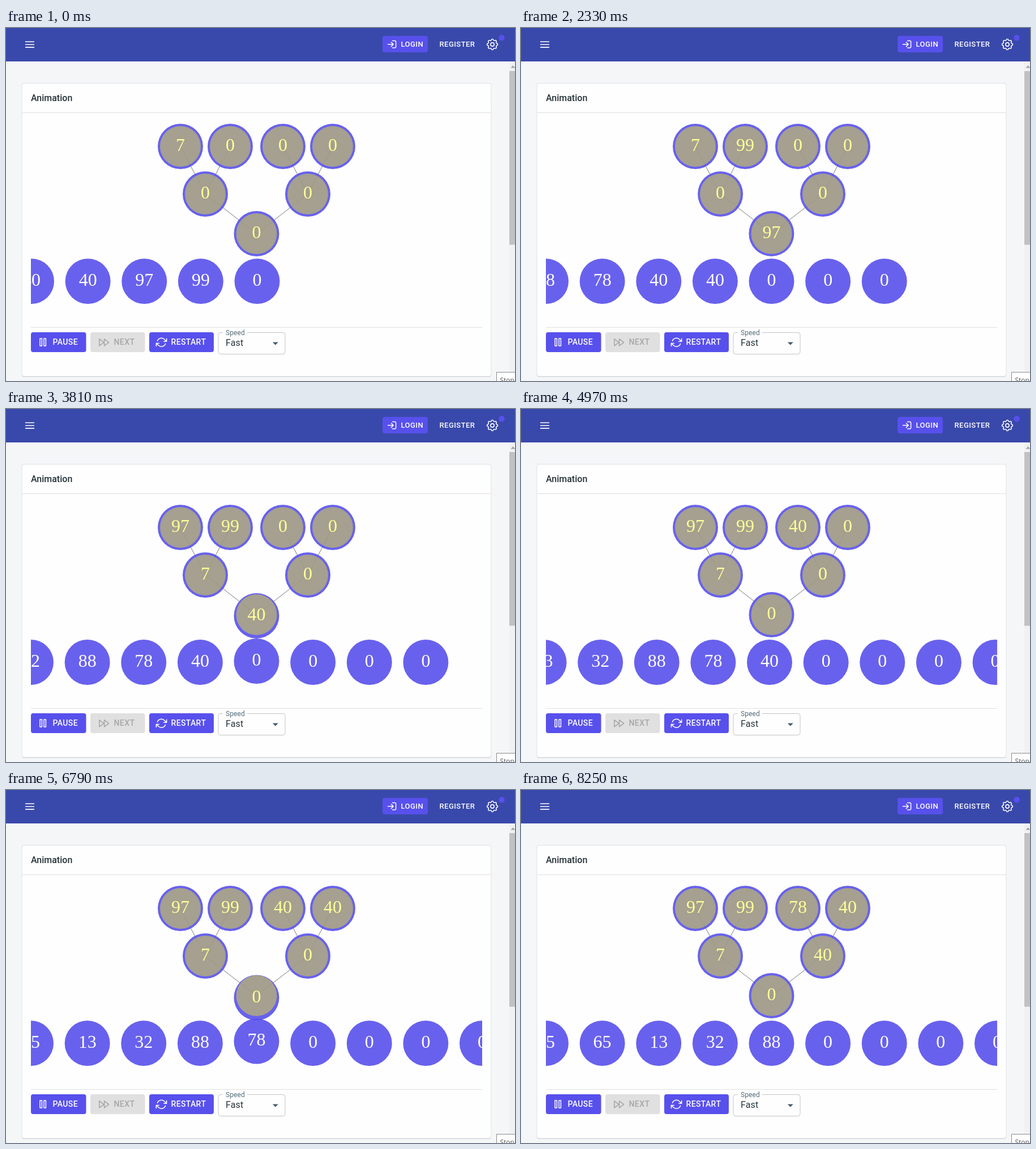
Write an HTML page with a canvas that moves like this. It is 899 px wide and 623 px high and loops after 8330 ms.

```html
<!DOCTYPE html>
<html lang="en">
<head>
<meta charset="utf-8">
<title>Heap animation</title>
<style>
  html, body { margin: 0; width: 100%; height: 100%; overflow: hidden; background: #f4f6f8; }
  #stage { position: absolute; left: 0; top: 0; width: 899px; height: 623px; overflow: hidden; }
  svg, canvas { position: absolute; display: block; }
  svg { left: 0; top: 0; }
  canvas { left: 44px; top: 151px; }
  text { font-family: Roboto, sans-serif; }
  .btn { font-size: 14px; font-weight: 500; letter-spacing: .4px; }
  .nav { font-size: 13px; font-weight: 500; letter-spacing: .46px; fill: #fff; }
  .icon { fill: none; stroke: #fff; stroke-width: 1.5; stroke-linecap: round; stroke-linejoin: round; }
</style>
</head>
<body>
<div id="stage">
<svg width="899" height="623" viewBox="0 0 899 623">
  <rect width="899" height="623" fill="#f4f6f8"/>

  <!-- card -->
  <rect x="28" y="98" width="829" height="518" rx="4" fill="#d3d6d9"/>
  <rect x="27.5" y="97" width="830" height="518" rx="4.5" fill="#dfe2e5"/>
  <rect x="28.5" y="98" width="828" height="516.3" rx="4" fill="#fefefe"/>
  <text x="44" y="129" font-size="16" font-weight="500" fill="#263238">Animation</text>
  <path d="M28 149.5H857M44 528.5H841" stroke="#e0e0e0"/>

  <!-- controls -->
  <rect x="44" y="537" width="97.5" height="35" rx="4" fill="#5850ec"/>
  <path class="icon" d="M60 548h3.4v13H60zM67 548h3.4v13H67z"/>
  <text class="btn" x="82.5" y="559" fill="#fff">PAUSE</text>

  <rect x="149" y="537" width="96.5" height="35" rx="4" fill="#e0e0e0"/>
  <path class="icon" style="stroke:#a6a6a6" d="M164.8 548.8l8 6-8 6zM173.6 548.8l8 6-8 6z"/>
  <text class="btn" x="190.5" y="559" fill="#a6a6a6">NEXT</text>

  <rect x="253" y="537" width="114" height="35" rx="4" fill="#5850ec"/>
  <g class="icon" style="stroke-width:1.8" transform="translate(264.5 544.8) scale(.833)">
    <path d="M23 4v6h-6M1 20v-6h6M3.51 9a9 9 0 0 1 14.85-3.36L23 10M1 14l4.64 4.36A9 9 0 0 0 20.49 15"/>
  </g>
  <text class="btn" x="291.5" y="559" fill="#fff">RESTART</text>

  <rect x="375" y="537.5" width="118" height="38" rx="4" fill="none" stroke="#c4c4c4"/>
  <rect x="383" y="535" width="43" height="5" fill="#fefefe"/>
  <text x="388" y="542" font-size="12" letter-spacing=".1" fill="#546e7a">Speed</text>
  <text x="388" y="561" font-size="16" letter-spacing=".15" fill="#263238">Fast</text>
  <path d="M470.8 554.5h10l-5 5z" fill="#455a6b"/>

  <!-- top bar -->
  <rect width="899" height="59" fill="#3949ab"/>
  <path d="M34 24.3h16M34 29.2h16M34 34.1h16" stroke="#fff" stroke-width="1.6"/>
  <rect x="665" y="14" width="80" height="29" rx="4" fill="#5850ec"/>
  <path class="icon" d="M674.5 28.8h9.6M680.4 25l3.8 3.8-3.8 3.8M682.6 22.5h4.2a1.8 1.8 0 0 1 1.8 1.8v9a1.8 1.8 0 0 1-1.8 1.8h-4.2"/>
  <text class="nav" x="697.5" y="32.5">LOGIN</text>
  <text class="nav" x="765.5" y="32.5">REGISTER</text>
  <g class="icon" transform="translate(846.4 16.4) scale(1.05)">
    <path d="M10.325 4.317c.426-1.756 2.924-1.756 3.35 0a1.724 1.724 0 0 0 2.573 1.066c1.543-.94 3.31.826 2.37 2.37a1.724 1.724 0 0 0 1.065 2.572c1.756.426 1.756 2.924 0 3.35a1.724 1.724 0 0 0-1.066 2.573c.94 1.543-.826 3.31-2.37 2.37a1.724 1.724 0 0 0-2.572 1.065c-.426 1.756-2.924 1.756-3.35 0a1.724 1.724 0 0 0-2.573-1.066c-1.543.94-3.31-.826-2.37-2.37a1.724 1.724 0 0 0-1.065-2.572c-1.756-.426-1.756-2.924 0-3.35a1.724 1.724 0 0 0 1.066-2.573c-.94-1.543.826-3.31 2.37-2.37.996.608 2.296.07 2.572-1.065z"/>
    <circle cx="12" cy="12" r="3"/>
  </g>
  <circle cx="875.5" cy="17.2" r="5.2" fill="#5850ec"/>

  <!-- scrollbar and tooltip -->
  <rect x="889" y="59" width="10" height="564" fill="#f1f1f1"/>
  <path d="M891.5 70.5h8l-4-4.5z" fill="#a3a3a3"/>
  <rect x="889" y="76" width="10" height="306.5" fill="#c1c1c1"/>
  <rect x="866.5" y="607.5" width="40" height="22" fill="#fff" stroke="#8a8a8a"/>
  <text x="872.5" y="625.5" font-size="12" style="font-family:'Open Sans',sans-serif" fill="#575757">Stop</text>
</svg>
<canvas id="view" width="797" height="360"></canvas>
</div>
<script>
const ctx = document.getElementById('view').getContext('2d');
const LOOP = 8330, MID = 442.5, STEP = 797 / 8, QUEUE_Y = 447;
const SPOTS = [[MID, 363], [352, 293], [533, 293], [308, 209], [396, 209], [489, 209], [577, 209]];
const START = [0, 0, 0, 7, 0, 0, 0];
const ITEMS = [0, 99, 97, 40, 40, 78, 88, 32, 13, 65, 25];

// time in ms, tick, phase (four phases per inserted item)
const KNOTS = [
  [0, 0, .136], [940, 12, 2.578], [1720, 22, 4.504], [2330, 30, 6.07],
  [3430, 44, 8.855], [3810, 49, 9.818], [4970, 64, 12.794],
  [6790, 87, 17.219], [8250, 106, 20.96], [LOOP, 107, 21.1]
];

const mix = (a, b, p) => a + (b - a) * p;
const ease = p => p < .5 ? 4 * p ** 3 : 1 - 4 * (1 - p) ** 3;

function lookup(v, from, to) {
  let i = 1;
  while (i < KNOTS.length - 1 && v >= KNOTS[i][from]) i++;
  const a = KNOTS[i - 1], b = KNOTS[i];
  return mix(a[to], b[to], (v - a[from]) / (b[from] - a[from]));
}

// The smaller child takes part in the swap; the left one wins a tie.
function smallerChild(heap, i) {
  const l = 2 * i + 1;
  return heap[l] <= heap[l + 1] ? l : l + 1;
}

function swap(list, a, b) {
  [list[a], list[b]] = [list[b], list[a]];
}

function sceneAt(phase) {
  const whole = Math.floor(phase), p = ease(phase - whole);
  const heap = START.slice(), queue = ITEMS.slice();
  let hole = 0, shift = 0, pair = null;
  for (let n = 0; n <= whole; n++) {
    const done = n < whole, round = Math.floor(n / 4), part = n % 4;
    if (part === 0) {
      shift = round + (done ? 1 : p);
      hole = 0;
    } else if (part === 1) {
      const head = round + 1;
      if (done) [heap[0], queue[head]] = [queue[head], heap[0]];
      else pair = [0, 7 + head];
    } else {
      const child = smallerChild(heap, hole);
      if (done) swap(heap, hole, child);
      else pair = [hole, child];
      hole = child;
    }
  }
  const balls = heap.map((v, i) => ({ v, x: SPOTS[i][0], y: SPOTS[i][1] }));
  queue.forEach((v, i) => balls.push({ v, x: MID + (shift - i) * STEP, y: QUEUE_Y }));
  if (pair) {
    const [a, b] = pair.map(i => balls[i]);
    const { x, y } = a;
    a.x = mix(x, b.x, p); a.y = mix(y, b.y, p);
    b.x = mix(b.x, x, p); b.y = mix(b.y, y, p);
  }
  return balls;
}

function disc(x, y, r, color) {
  ctx.fillStyle = color;
  ctx.beginPath();
  ctx.arc(x, y, r, 0, 2 * Math.PI);
  ctx.fill();
}

function draw(phase) {
  const balls = sceneAt(phase);
  ctx.setTransform(1, 0, 0, 1, 0, 0);
  ctx.clearRect(0, 0, 797, 360);
  ctx.translate(-44, -151);

  ctx.strokeStyle = '#777';
  ctx.lineWidth = 1;
  ctx.beginPath();
  for (let i = 1; i < 7; i++) {
    ctx.moveTo(...SPOTS[(i - 1) >> 1]);
    ctx.lineTo(...SPOTS[i]);
  }
  ctx.stroke();

  for (const b of balls) disc(b.x, b.y, 40, 'rgba(88,80,236,.9)');
  ctx.font = '32px "Liberation Serif", "Times New Roman", serif';
  ctx.textAlign = 'center';
  ctx.fillStyle = '#fff';
  for (const b of balls) ctx.fillText(b.v, b.x, b.y + 8);
  for (const [x, y] of SPOTS) disc(x, y, 36, 'rgba(255,255,0,.4)');
}

const begin = performance.now();
function frame() {
  const t = (performance.now() - begin) % LOOP;
  const tick = Math.min(106, Math.floor(lookup(t, 0, 1) + .15));
  draw(lookup(tick, 1, 2));
  requestAnimationFrame(frame);
}
frame();
</script>
</body>
</html>
```
